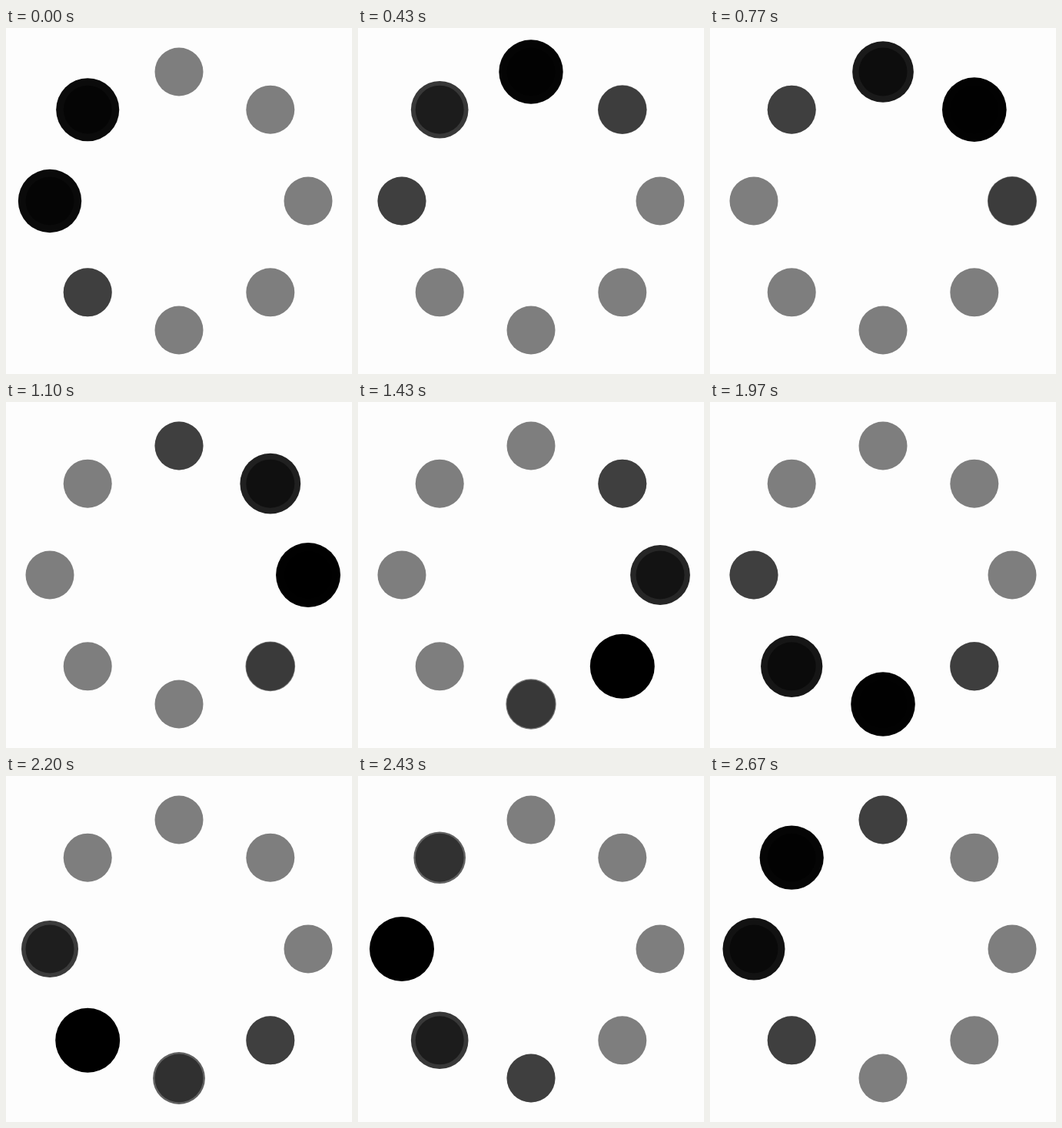
These frames come from a looping animation (450 by 450 pixels, 2710 ms). An HTML page with a canvas:

```html
<!DOCTYPE html>
<html lang="en">
<head>
<meta charset="utf-8">
<title>Loading ring</title>
<style>
  html, body { margin: 0; width: 100%; height: 100%; overflow: hidden; background: #fdfdfd; }
  canvas { display: block; width: 450px; height: 450px; }
</style>
</head>
<body>
<canvas id="stage" width="450" height="450"></canvas>
<script>
const ctx = document.getElementById('stage').getContext('2d');

const LOOP = 2710, FPS = 30;
const CYCLE = 2640, STEP = 320, PULSE = 1266; // ms
const COUNT = 8, CENTER = 225, RING = 168;
const DOT = 31.5, GROW = 10.5;

function smooth(from, to, x) {
  const k = Math.min(1, Math.max(0, (x - from) / (to - from)));
  return k * k * (3 - 2 * k);
}

function disc(x, y, r, alpha) {
  ctx.fillStyle = `rgba(0,0,0,${alpha})`;
  ctx.beginPath();
  ctx.arc(x, y, r, 0, Math.PI * 2);
  ctx.fill();
}

function drawDot(i, t) {
  const angle = (i / COUNT) * Math.PI * 2 - Math.PI / 2;
  const x = CENTER + RING * Math.cos(angle);
  const y = CENTER + RING * Math.sin(angle);
  const age = (t - i * STEP + CYCLE) % CYCLE;

  disc(x, y, DOT, 0.5);
  // A second disc swells and darkens over the resting one.
  if (age > 0 && age < PULSE) {
    const swell = smooth(70, 475, age) - smooth(655, 1040, age);
    disc(x, y, DOT + GROW * swell, 0.5 + 0.5 * swell);
  }
}

function draw(now) {
  // The motion advances in hard steps of 1/30 s.
  const tick = Math.floor((now % LOOP) * FPS / 1000 + 0.12);
  const t = tick * 1000 / FPS;
  ctx.fillStyle = '#fdfdfd';
  ctx.fillRect(0, 0, 450, 450);
  for (let i = 0; i < COUNT; i++) drawDot(i, t);
}

const start = performance.now();
function frame() {
  draw(performance.now() - start);
  requestAnimationFrame(frame);
}
frame();
</script>
</body>
</html>
```
